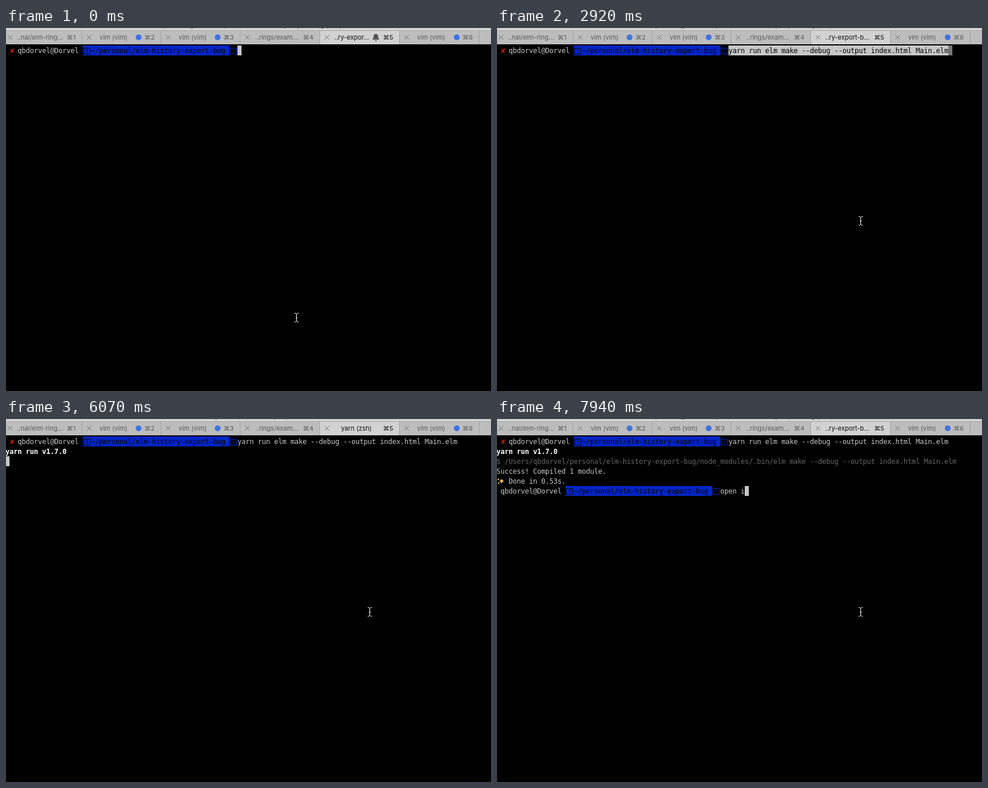
An HTML page that plays this animation: 834 by 623 pixels, repeating every 8 s.

```html
<!DOCTYPE html>
<html lang="en">
<head>
<meta charset="utf-8">
<title>Terminal session</title>
<style>
  html, body { margin: 0; width: 100%; height: 100%; overflow: hidden; background: #000; }
  svg { display: block; width: 834px; height: 623px; }
  text { white-space: pre; }
  .mono { font: 12px "DejaVu Sans Mono", monospace; }
  .bold { font-weight: 700; }
  .ui { font: 11px Inter, "DejaVu Sans", sans-serif; }
</style>
</head>
<body>
<svg viewBox="0 0 834 623">
  <rect width="834" height="623"/>
  <g id="tabs"></g>
  <g id="screen"></g>
  <g id="pointer"></g>
</svg>
<script>
const LOOP = 8000, CELL = 7, ROW = 17, LEFT = -1, TOP = 30;
const GREY = '#c7c7c7', BLUE = '#0225c7', RED = '#c91b00', DIM = '#666';
const USER = 'qbdorvel', HOST = 'Dorvel', PROJECT = 'elm-history-export-bug';
const COMMAND = 'make --debug --output index.html Main.elm';

// Timelines: [start in ms, value]
const tabTitle = [[0, '..ry-expor…'], [1040, '..ry-export-b…'], [5230, 'yarn (zsh)'],
  [6280, 'yarn (node)'], [6690, '..ry-export-b…']];
const windowTitle = [[0, `5. ${USER}@${HOST}: ~/personal/${PROJECT} (zsh)`],
  [5230, '5. yarn run elm make (zsh)'], [6280, '5. yarn run elm (node)'],
  [6690, `5. ~/personal/${PROJECT}`], [7110, `5. ${USER}@${HOST}: ~/personal/${PROJECT} (zsh)`]];
const pointer = [[0, ['beam', 499, 497]], [210, ['arrow', 499, 497]], [1040, ['beam', 499, 497]],
  [2090, ['cross', 499, 497]], [2290, ['beam', 499, 497]], [2500, ['beam', 617, 345]],
  [2710, ['cross', 625, 331]], [2920, ['beam', 625, 331]]];
const typed = [[6690, ''], [7530, 'op'], [7730, 'open'], [7940, 'open i']];
const cursorCell = [[0, [57, 0]], [1040, [111, 0]], [5230, [0, 1]], [6070, [0, 2]],
  [6280, [0, 3]], [6490, [0, 4]], [6690, [55, 5]], [7530, [57, 5]], [7730, [59, 5]], [7940, [61, 5]]];

const changes = [...new Set([tabTitle, windowTitle, pointer, cursorCell, [[3340]]]
  .flatMap(line => line.map(([start]) => start)))].sort((a, b) => a - b);

const valueAt = (line, t) => line.reduce((value, [start, next]) => t >= start ? next : value, null);
const colX = col => LEFT + col * CELL;
const rowY = row => TOP + row * ROW;
const rect = (x, y, w, h, fill) => `<rect x="${x}" y="${y}" width="${w}" height="${h}" fill="${fill}"/>`;
const cells = (col, row, count, fill) => rect(colX(col), rowY(row), count * CELL, ROW, fill);
const label = (x, text, fill, anchor) =>
  `<text class="ui" x="${x}" y="20" fill="${fill}" text-anchor="${anchor}">${text}</text>`;

// Each character sits in its own terminal cell.
function print(col, row, text, fill = GREY, style = '') {
  const xs = [...text].map((_, i) => colX(col + i)).join(' ');
  return `<text class="mono ${style}" x="${xs}" y="${rowY(row) + 13}" fill="${fill}">${text}</text>`;
}

function missingGlyph(col, row, color) {
  const x = colX(col) + 1.5, y = rowY(row) + 4.5;
  return `<rect x="${x}" y="${y}" width="11" height="10" fill="none" stroke="${color}"/>
    <text x="${x + 5.5}" y="${y + 8.2}" font-family="DejaVu Sans, sans-serif" font-size="8.5"
      text-anchor="middle" fill="${color}">?</text>`;
}

function prompt(col, row) {
  const path = col + 16;
  return print(col, row, `${USER}@${HOST}`) + cells(path, row, 36, BLUE) +
    missingGlyph(path, row, '#000') + print(path + 2, row, `~/personal/${PROJECT}`, '#000') +
    missingGlyph(path + 36, row, BLUE);
}

function star(x, y, r) {
  const k = r * 0.2;
  return `<path fill="#f8cd4a" d="M${x} ${y - r}Q${x + k} ${y - k} ${x + r} ${y}Q${x + k} ${y + k} ${x} ${y + r}
    Q${x - k} ${y + k} ${x - r} ${y}Q${x - k} ${y - k} ${x} ${y - r}"/>`;
}

function drawTabs(t) {
  const edges = [-6, 130, 266, 402, 539, 676, 813];
  const titles = ['..nal/elm-ring…', 'vim (vim)', 'vim (vim)', '..rings/exam…', valueAt(tabTitle, t), 'vim (vim)'];
  const centers = [58.5, 185, 321, 465.5, t < 1040 ? 594.5 : 602.5, 731];
  let out = rect(0, 0, 834, 28, '#bdbdbd') + rect(0, 0, 834, 4, '#d2d2d2') + rect(0, 4, 834, 1, '#a6a6a6');
  out += `<text class="ui" x="416" y="-1.5" text-anchor="middle" fill="#555">${valueAt(windowTitle, t)}</text>`;
  titles.forEach((title, i) => {
    const active = i === 4, ink = active ? '#111' : '#5c5c5c', x = edges[i], end = edges[i + 1];
    if (active) out += rect(x + 1, 5, end - x - 1, 23, '#d2d2d2');
    out += rect(end, 5, 1, 23, '#a3a3a3');
    out += `<path d="M${x + 9} 12l8 8m0-8l-8 8" stroke="#777" fill="none"/>`;
    out += label(centers[i], title, ink, 'middle') + label(end - 10.3, `⌘${i + 1}`, ink, 'end');
    if (title === 'vim (vim)') out += `<circle cx="${end - 38}" cy="16" r="5" fill="#4272e3"/>`;
  });
  if (t < 1040) {
    out += '<path fill="#555" d="M636 10q4 .5 4 5q0 3 2 5h-12q2-2 2-5q0-4.5 4-5M634 21h4q-2 3-4 0"/>';
  }
  return out;
}

function drawScreen(t) {
  const pasted = t >= 1040 && t < 3340;
  let out = `<text x="${colX(1)}" y="43" font-family="DejaVu Sans, sans-serif" font-size="11" fill="${RED}">✘</text>`;
  out += prompt(3, 0);
  if (pasted) out += cells(57, 0, 54, GREY);
  if (t >= 1040) out += print(57, 0, `yarn run elm ${COMMAND}`, pasted ? '#000' : GREY);
  if (t >= 6070) out += print(0, 1, 'yarn run v1.7.0', '#fff', 'bold');
  if (t >= 6280) out += print(0, 2, `$ /Users/${USER}/personal/${PROJECT}/node_modules/.bin/elm ${COMMAND}`, DIM);
  if (t >= 6490) out += print(0, 3, 'Success! Compiled 1 module.');
  if (t >= 6690) {
    out += star(8, 106.5, 4.5) + star(2.5, 103.5, 2) + star(3, 110, 2);
    out += print(3, 4, 'Done in 0.53s.') + prompt(1, 5) + print(55, 5, valueAt(typed, t));
  }
  return out + cells(...valueAt(cursorCell, t), 1, pasted ? '#767676' : GREY);
}

const pointerShapes = {
  beam: '<path d="M-3-7.5H-1L.5-6V6L-1 7.5H-3M4-7.5H2L.5-6M.5 6L2 7.5H4M-1 .5H2" fill="none" stroke="#fff"/>',
  arrow: '<path d="M.5.5V13.500L3.500 10.700L5.500 15.300L7.700 14.300L5.700 9.800H9.800Z" fill="#000" stroke="#fff"/>',
  cross: '<path d="M-7-1.500H12M2.500-11V8" fill="none" stroke="#fff"/>'
};

function drawPointer(t) {
  const [kind, x, y] = valueAt(pointer, t);
  return `<g transform="translate(${x} ${y})">${pointerShapes[kind]}</g>`;
}

const layers = { tabs: drawTabs, screen: drawScreen, pointer: drawPointer };
let shown = -1;

function update(now) {
  const t = now % LOOP;
  const current = changes.filter(start => start <= t).pop();
  if (current !== shown) {
    shown = current;
    for (const id in layers) document.getElementById(id).innerHTML = layers[id](t);
  }
}

const began = performance.now();
function tick() {
  update(performance.now() - began);
  requestAnimationFrame(tick);
}
tick();
</script>
</body>
</html>
```
